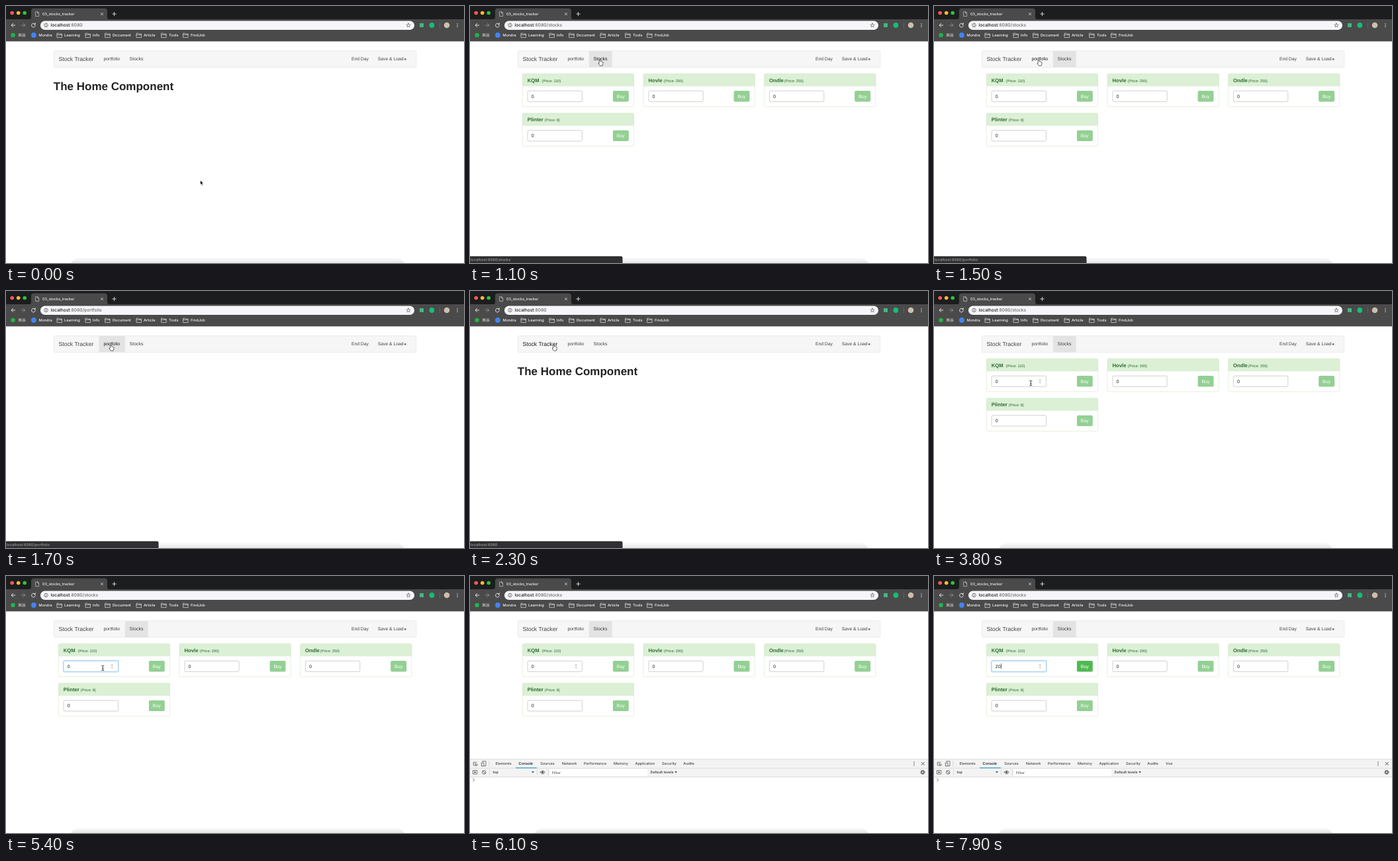
These frames come from a looping animation (692 by 388 pixels, 8 s). An HTML page:

```html
<!DOCTYPE html>
<html lang="en">
<head>
<meta charset="utf-8">
<title>Stock Tracker</title>
<style>
html, body { margin: 0; width: 100%; height: 100%; overflow: hidden; background: #fff; }
svg { display: block; width: 100%; height: 100%; }
text { font-family: "Liberation Sans", Arial, sans-serif; text-rendering: geometricPrecision; white-space: pre; }
.ui { font-family: Inter, "Noto Sans CJK SC", sans-serif; font-weight: 500; }
.line { fill: none; stroke-linecap: round; stroke-linejoin: round; }
</style>
</head>
<body>
<svg id="stage" viewBox="0 0 692 388"></svg>
<script>
const LOOP = 8000, TICK = 100;
const stage = document.getElementById('stage');

const rect = (x, y, w, h, fill, more = '') =>
  `<rect x="${x}" y="${y}" width="${w}" height="${h}" fill="${fill}" ${more}/>`;
const dot = (x, y, r, fill, more = '') => `<circle cx="${x}" cy="${y}" r="${r}" fill="${fill}" ${more}/>`;
const line = (d, color, w = 0.8, more = '') =>
  `<path class="line" d="${d}" stroke="${color}" stroke-width="${w}" ${more}/>`;
const text = (x, y, size, fill, str, more = '') =>
  `<text x="${x}" y="${y}" font-size="${size}" fill="${fill}" ${more}>${str}</text>`;
const ui = (x, y, size, fill, str, more = '') => text(x, y, size, fill, str, `class="ui" ${more}`);
const group = (id, body, more = '') => `<g id="${id}" ${more}>${body}</g>`;
const arrowDown = (x, y, r, fill) => `<path d="M${x - r} ${y}h${2 * r}l${-r} ${r * 1.3}z" fill="${fill}"/>`;
const kebab = (x, y, fill) => [-2.4, 0, 2.4].map(d => dot(x, y + d, 0.7, fill)).join('');

function browser() {
  const lights = ['#ff5a52', '#fdbd2e', '#28c83e'].map((c, i) => dot(9.2 + i * 9.5, 10.5, 2.8, c)).join('');
  const folder = x => line(`M${x} 47.2v-6h2.6l0.9 1h4v5zM${x} 43.4h7.5`, '#e2e2e2', 0.7);
  const marks = [[77, 88, 'Learning'], [120, 131, 'Info'], [149.7, 161, 'Document'],
    [197, 208, 'Article'], [234.6, 246, 'Tools'], [267.6, 279, 'FindJob']];
  return rect(0, 0, 692, 21, '#1c1d1f') + rect(0, 20, 692, 33.4, '#4a4a4b') + lights +
    '<path d="M34 20.500q4-.3 4-4v-9q0-4 4-4h107q4 0 4 4v9q0 3.700 4 4z" fill="#4a4a4b"/>' +
    line('M45 8.700h2.800l1.800 1.800v5h-4.600zM47.600 8.700v2h2', '#dcdcdc', 0.6) +
    ui(55, 14, 5.55, '#f2f2f2', '03_stocks_tracker') +
    line('M143.300 10.300l3.400 3.400M146.700 10.300l-3.400 3.400', '#e4e4e4', 0.7) +
    line('M163.500 9.300v5.400M160.800 12h5.400', '#e4e4e4', 0.9) +
    line('M13.800 29h-5.600M10.800 26.300l-2.700 2.700l2.700 2.700', '#f0f0f0', 0.9) +
    line('M23.200 29h5.600M26.200 26.300l2.700 2.700l-2.700 2.700', '#929294', 0.9) +
    line('M43.700 27.200a2.900 2.900 0 1 0 .7 2.300M44.300 25.800v2h-2', '#f0f0f0', 0.9) +
    rect(52, 22.4, 565, 13.6, '#f6f5f9', 'rx="6.8"') +
    dot(60.5, 29, 2.8, 'none', 'stroke="#444" stroke-width=".7"') +
    line('M60.500 28.700v1.800M60.500 27.400v.1', '#444', 0.7) +
    ui(67.5, 31.3, 6.7, '#1c1c1c', 'localhost<tspan id="path" fill="#6a6a6a"></tspan>') +
    line('M608 25.900l.9 2.100l2.200.2l-1.700 1.500l.5 2.200l-1.900-1.200l-1.900 1.200l.5-2.200l-1.700-1.500l2.200-.2z', '#444', 0.6) +
    rect(625, 26, 6, 6, '#41b883') + dot(643.4, 29, 3.9, '#16bd72') +
    rect(655, 24.5, 0.6, 9, '#777') + dot(666, 29, 4.3, '#cdbfae') + kebab(682, 29, '#eee') +
    dot(10.6, 44, 3.2, '#21b54a') + ui(18.3, 46.2, 5.8, '#f6f6f6', '岚谷') +
    dot(41.9, 44, 3.9, '#4285f4') + ui(49.4, 46.2, 5.5, '#f6f6f6', 'Mondra') +
    marks.map(([fx, x, name]) => folder(fx) + ui(x, 46.2, 5.65, '#f6f6f6', name)).join('');
}

function navbar() {
  return rect(72.2, 67.7, 547.6, 25, '#f6f6f6', 'rx="2" stroke="#e2e2e2" stroke-width=".6"') +
    rect(0, 68, 35, 24.5, '#e3e3e3', 'id="active"') +
    text(79.6, 82.8, 8.65, '#444', 'Stock Tracker', 'id="home"') +
    text(147.4, 82.3, 6.95, '#444', 'portfolio', 'id="portfolio"') +
    text(186.6, 82.3, 7, '#444', 'Stocks', 'id="stocks"') +
    text(521.9, 82.3, 6.8, '#444', 'End Day') +
    text(561.7, 82.3, 6.8, '#444', 'Save &amp; Load') + arrowDown(603.2, 79.5, 1.9, '#444');
}

function card(x, y, name, priceX, price, first) {
  const top = `<path d="M${x} ${y + 19}v-17q0-2 2-2h164.500q2 0 2 2v17z" fill="#dbf0d5"/>`;
  return rect(x, y, 168.3, 49.8, '#fff', 'rx="2"') + top +
    rect(x, y, 168.3, 49.8, 'none', 'rx="2" stroke="#d3e6c4" stroke-width=".6"') +
    text(x + 7.5, y + 12.6, 7.7, '#2f6a32', name, 'font-weight="bold"') +
    text(priceX, y + 12.6, 5.65, '#2a632d', `(Price: ${price})`) +
    (first ? rect(x + 7.2, y + 25.4, 83.6, 17.4, 'none', 'id="glow" rx="2.4" stroke="#cfe5f8" stroke-width="1.6"') : '') +
    rect(x + 7.8, y + 26, 82.4, 16.2, '#fff', `${first ? 'id="field"' : ''} rx="1.9" stroke="#bdbdbd" stroke-width=".7"`) +
    text(x + 13.5, y + 36.5, 7.1, '#222', '0', first ? 'id="amount"' : '') +
    rect(x + 136.6, y + 25.9, 23.9, 16.4, '#93d093', `${first ? 'id="buy"' : ''} rx="1.9"`) +
    text(x + 142.4, y + 36.5, 7.1, '#fff', 'Buy');
}

function cards() {
  return card(79.3, 102.2, 'KQM', 108.6, 110, true) +
    card(262, 102.2, 'Hovle', 292.8, 200) +
    card(444.6, 102.2, 'Ondle', 474.8, 250) +
    card(79.3, 161.8, 'Plinter', 112.8, 8) +
    group('spin', '<path d="M158.500 135.200l1.700-2.100l1.700 2.100zM158.500 137.400l1.700 2.100l1.700-2.100z" fill="#b4b4b4"/>') +
    rect(0, 132.2, 0.7, 8, '#222', 'id="caret"');
}

function devtools() {
  const tabs = [[38.5, 'Elements'], [73.5, 'Console'], [106.2, 'Sources'], [139, 'Network'],
    [172, 'Performance'], [217, 'Memory'], [249.5, 'Application'], [290, 'Security'], [322.3, 'Audits']];
  const ink = '#444';
  const split = (x, y) => rect(x, y, 0.6, 9, '#ccc');
  const bars = rect(0, 276.5, 692, 111.5, '#fff') + rect(0, 276.5, 692, 27, '#f3f3f3') +
    [276.5, 289.8, 303].map(y => rect(0, y, 692, 0.6, '#cacaca')).join('');
  const parts = line('M10 281.200h-4.800v4.800h1.800M7.800 283.200l1 4l.9-1.500l1.700-.5z', ink, 0.7) +
    line('M18.800 281v-1.300h5.200v7h-2.800M17.600 282h3.200v5h-3.200z', ink, 0.7) + split(28.5, 279) +
    tabs.map(([x, name]) => ui(x, 285.4, 5.5, name === 'Console' ? '#111' : ink, name)).join('') +
    ui(350, 285.4, 5.5, ink, 'Vue', 'id="vue"') + rect(69, 289, 32, 1.3, '#3fa9c9') +
    kebab(671, 283.4, ink) + line('M682.200 281.300l4.200 4.200M686.400 281.300l-4.200 4.200', ink, 0.9) +
    line('M4.800 293.500h6v5.500h-6z', ink, 0.7) + `<path d="M6.600 294.600l2.700 1.700l-2.700 1.700z" fill="${ink}"/>` +
    dot(21.2, 296.3, 2.7, 'none', `stroke="${ink}" stroke-width=".8"`) + line('M19.300 294.400l3.800 3.800', ink) +
    split(29, 292) + ui(34.4, 298.4, 5.45, '#333', 'top') + arrowDown(95, 295, 1.9, ink) + split(101.5, 292) +
    line('M106.200 296.300q3.500-4.600 7 0q-3.500 4.600-7 0z', ink, 0.8) + dot(109.7, 296.3, 1.4, ink) + split(118, 292) +
    rect(121, 291.2, 147, 11, '#fff') + ui(123.7, 298.5, 5.55, '#666', 'Filter') +
    ui(272.6, 298.4, 5.4, '#333', 'Default levels') + arrowDown(311, 295, 1.9, ink) +
    dot(684, 296.3, 2, 'none', `stroke="${ink}" stroke-width="1.2"`) +
    dot(684, 296.3, 3.1, 'none', `stroke="${ink}" stroke-width="1" stroke-dasharray="1.22 1.22"`) +
    line('M4.700 306l2 1.900l-2 1.900', '#444', 0.8) + rect(11.6, 304.3, 0.7, 8, '#222', 'id="prompt"');
  return bars + group('parts', parts);
}

const pointers =
  group('arrow', '<path d="M0 0v7l1.600-1.500l1.200 2.700l1.200-.5l-1.200-2.600h2.200z" fill="#111" stroke="#fff" stroke-width=".6"/>') +
  group('hand', '<path d="M-1.600-4q.9-.9 1.400.2l.5 2.700q.9-.7 1.500.2q.9-.4 1.200.5q1-.2 1 1l-.3 2.500l-.7 2h-3.600l-2.400-3.100q-.2-1.100 1.200-.5z" fill="#fff" stroke="#222" stroke-width=".7"/>') +
  group('beam', line('M-1.600-3.700q1.600 0 1.600.9q0-.9 1.600-.9M0-2.800v5.800M-1.600 3.800q1.600 0 1.600-.9q0 .9 1.600.9M-.8.9h1.600', '#222', 0.8));

stage.innerHTML =
  '<defs><linearGradient id="shade" x1="0" y1="0" x2="0" y2="1"><stop offset="0" stop-color="#fff"/>' +
  '<stop offset="1" stop-color="#e6e6e6"/></linearGradient></defs>' +
  rect(0, 0, 692, 388, '#fff') + browser() + navbar() +
  group('title', text(71.8, 127.1, 17, '#222', 'The Home Component', 'font-weight="bold"')) +
  group('cards', cards()) + group('tools', devtools()) +
  '<path d="M98 388q6-9 18-9h468q12 0 18 9z" fill="url(#shade)"/>' +
  group('status', '<path d="M0 377.800h228q2.500 0 2.500 2.500v7.700h-230.500z" fill="#303032"/>' +
    ui(0.8, 385, 5.65, '#9a9a9a', '', 'id="link"')) +
  group('pointer', pointers);

const $ = id => document.getElementById(id);
const show = (id, on) => $(id).setAttribute('display', on ? 'inline' : 'none');
const set = (id, name, value) => $(id).setAttribute(name, value);
const within = (t, a, b) => t >= a && t < b;
const at = (steps, t) => steps.filter(s => s[0] <= t).pop()[1];

const PAGES = [[0, 'home'], [1100, 'stocks'], [1700, 'portfolio'], [2200, 'home'], [3000, 'stocks']];
const STATUS = [[0, null], [1000, '/stocks'], [1400, '/portfolio'], [1900, ''],
  [2600, '/portfolio'], [2700, '/stocks'], [3500, null]];
const AMOUNT = [[0, '0'], [7600, ''], [7800, '2'], [7900, '20']];
const CARET_X = { '0': 96.8, '': 93, '2': 97, '20': 101 };
const MOVES = [[0, 293.5, 263], [900, 197, 85], [1100, 197, 85], [1500, 159, 85], [1700, 159, 85],
  [2000, 127.3, 85], [2400, 127.3, 85], [2800, 196.3, 85], [3200, 196.3, 85], [3800, 146.3, 139], [LOOP, 146.3, 139]];
const FOCUS = [[0, 0], [3900, 0.5], [4000, 1], [5900, 0.6], [6000, 0.2], [6100, 0], [7100, 0.6], [7200, 1]];

function place(t) {
  const i = MOVES.findIndex(m => m[0] > t);
  const [t0, x0, y0] = MOVES[i - 1], [t1, x1, y1] = MOVES[i];
  const u = (t - t0) / (t1 - t0), s = u * u * (3 - 2 * u);
  return [x0 + (x1 - x0) * s, y0 + (y1 - y0) * s];
}

function draw(t) {
  const page = at(PAGES, t), status = at(STATUS, t), amount = at(AMOUNT, t), focus = at(FOCUS, t);
  const [x, y] = place(t);
  const onNav = y < 92.5;
  const onField = y > 128 && y < 144.5 && x > 87 && x < 170;
  const hover = !onNav ? '' : x < 140 ? 'home' : x < 180 ? 'portfolio' : 'stocks';

  $('path').textContent = ':8080' + (page === 'home' ? '' : '/' + page);
  show('title', page === 'home');
  show('cards', page === 'stocks');
  show('active', page !== 'home');
  set('active', 'x', page === 'stocks' ? 179.8 : 140.4);
  set('active', 'width', page === 'stocks' ? 34.9 : 39.4);
  for (const id of ['home', 'portfolio', 'stocks'])
    set(id, 'fill', id === hover ? '#1c1c1c' : '#444');

  show('status', status !== null);
  $('link').textContent = 'localhost:8080' + (status || '');

  $('amount').textContent = amount;
  set('glow', 'opacity', focus);
  set('field', 'stroke', focus >= 0.5 ? '#86bfec' : '#bdbdbd');
  set('buy', 'fill', amount > 0 ? '#52b952' : '#93d093');
  show('spin', onField);
  show('caret', within(t, 3900, 4400) || within(t, 4900, 5400) || within(t, 7100, LOOP));
  set('caret', 'x', CARET_X[amount]);

  show('tools', t >= 5900);
  show('parts', t >= 6000);
  show('vue', t >= 6300);
  show('prompt', within(t, 6400, 6900));

  show('pointer', t < 5500 || within(t, 7100, 7600));
  set('pointer', 'transform', `translate(${x} ${y})`);
  show('arrow', !onNav && !onField);
  show('hand', onNav);
  show('beam', onField);
}

const start = performance.now();
function frame() {
  const t = (performance.now() - start) % LOOP;
  draw(Math.floor(t / TICK) * TICK);
  requestAnimationFrame(frame);
}
frame();
</script>
</body>
</html>
```
